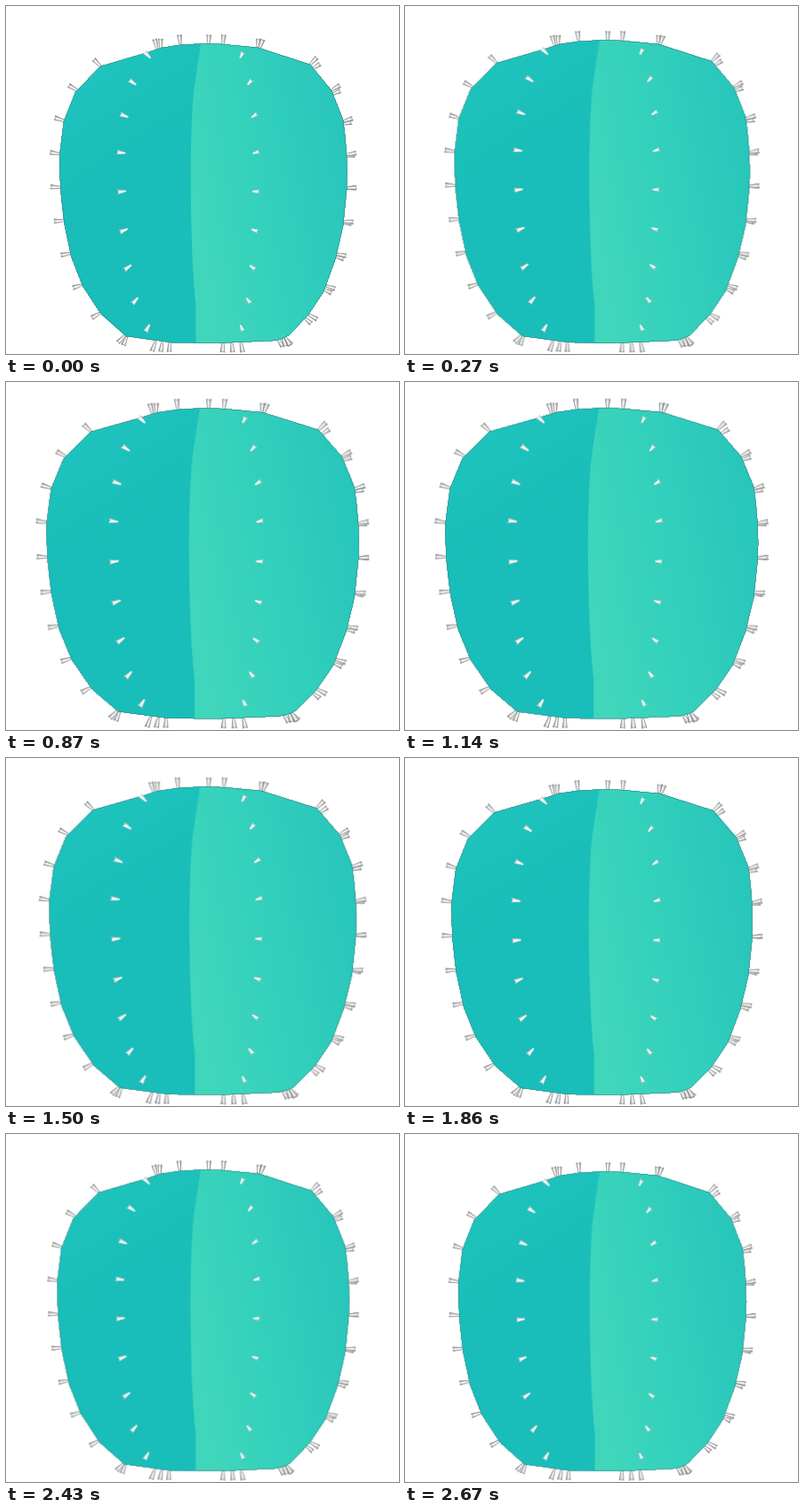
These frames come from a looping animation (442 px wide and 392 px high, 2700 ms). An HTML page:

```html
<!DOCTYPE html>
<html lang="en">
<head>
<meta charset="utf-8">
<title>Breathing cactus</title>
<style>
  html, body { margin: 0; width: 100%; height: 100%; overflow: hidden; background: #fff; }
  svg { display: block; width: 442px; height: 392px; }
  #cactus { transform-origin: 230px 392px; animation: breathe 2700ms linear infinite; }
  @keyframes breathe {
    0%, 100% { transform: scale(1, 1); }
    36.3% { transform: scale(1.097, 1.0416); }
  }
  .outline { fill: none; stroke: #2c8885; stroke-width: .7; shape-rendering: crispEdges; }
  .outer path { fill: url(#spine); stroke: #777; stroke-width: .6; }
  .inner path { fill: url(#glint); stroke: #a9c4c2; stroke-width: .4; }
</style>
</head>
<body>
<svg viewBox="0 0 442 392">
  <defs>
    <path id="body" d="M219 42.5L243 43 284 47 342 66 366 95 379 128Q385 170 383 208L379 248 370.5 285 357 322 340 348 318 371Q310 376 300 377L243 379.5H213L185 379 134.5 372 107.5 348 86.5 316 73.5 283 65.5 245Q60 208 60 170L65 130 78 97 106 68 160 52 175 47 195 44Z"/>
    <clipPath id="inside"><use href="#body"/></clipPath>
    <linearGradient id="spine" x1="0" y1="0" x2="0" y2="1">
      <stop offset="0" stop-color="#999"/>
      <stop offset=".35" stop-color="#fafafa"/>
      <stop offset=".65" stop-color="#e2e2e2"/>
      <stop offset="1" stop-color="#777"/>
    </linearGradient>
    <linearGradient id="glint" x1="0" y1="0" x2="0" y2="1">
      <stop offset="0" stop-color="#dfe8e7"/>
      <stop offset=".5" stop-color="#fff"/>
      <stop offset="1" stop-color="#b4b9b9"/>
    </linearGradient>
    <linearGradient id="shade" gradientUnits="userSpaceOnUse" x1="75" y1="70" x2="150" y2="190">
      <stop offset="0" stop-color="#1fc4bd"/>
      <stop offset="1" stop-color="#19bdb9"/>
    </linearGradient>
    <linearGradient id="light" gradientUnits="userSpaceOnUse" x1="208" y1="215" x2="382" y2="185">
      <stop offset="0" stop-color="#3fd6bc"/>
      <stop offset=".5" stop-color="#32d0bc"/>
      <stop offset="1" stop-color="#29c6bb"/>
    </linearGradient>
  </defs>
  <g id="cactus">
    <g class="outer"></g>
    <use href="#body" fill="url(#shade)"/>
    <path clip-path="url(#inside)" fill="url(#light)" d="M220 36L212 90Q208 120 207.7 190Q208 290 213.5 337V390H400V36Z"/>
    <use href="#body" class="outline"/>
    <g class="inner"></g>
  </g>
</svg>
<script>
  const body = document.getElementById("body");
  const perimeter = body.getTotalLength();

  function spine(layer, x, y, angle, from, to, width) {
    const p = document.createElementNS("http://www.w3.org/2000/svg", "path");
    p.setAttribute("d", `M${from}-.8L${to}${-width}L${to - 1} 0L${to} ${width}L${from} .8Z`);
    p.setAttribute("transform", `translate(${x} ${y}) rotate(${angle})`);
    document.querySelector(layer).append(p);
  }

  const rimSpine = (x, y, angle, length = 11) => spine(".outer", x, y, angle, -2, length, 2.4);

  function sideSpine(distance, angle, length) {
    const { x, y } = body.getPointAtLength(distance);
    rimSpine(x, y, angle, length);
  }

  function tuft(x, y, step, angle, turn, count) {
    for (let j = 0; j < count; j++) rimSpine(x + step * j, y, angle + turn * j);
  }

  // Evenly spaced spines down both sides, with a shorter one behind each on the right.
  for (let i = 0; i < 10; i++) {
    const t = i - 4.5, fan = 6 * t + .2 * t ** 3, skew = Math.abs(i - 4);
    const along = 37.7 * i;
    sideSpine(126 + along + 1.5 * skew, fan + 2.5 * skew, 9);
    sideSpine(126 + along, fan);
    sideSpine(perimeter - 116 - along, 180 - fan);
  }

  // Crown and base.
  tuft(170, 48, 4, -105, 14, 2);
  tuft(283, 48, 2, -85, 15, 2);
  for (const x of [196, 228, 244]) rimSpine(x, 43.5, -90 + (x - 222) * .2);
  tuft(136, 372, 3, 112, -8, 1);
  tuft(168, 378.5, 8, 110, -9, 3);
  tuft(244, 379, 10, 93, -7, 3);
  tuft(311, 373, 3, 72, -12, 2);

  // Two bowed columns on the front.
  for (let i = 0; i < 9; i++) {
    const t = (i - 4) / 4;
    const y = 209 + 154 * (1.15 * t - .15 * t ** 3);
    const bow = 29 * Math.abs(t) ** 2.6 + 2 * Math.sin(Math.PI * t);
    spine(".inner", 130 + bow, y, 180 - (y - 190) * .34, -5, 4.5, 2.5);
    spine(".inner", 281 - .55 * bow, y, (y - 205) * .42, -4, 3.5, 2.2);
  }
</script>
</body>
</html>
```
